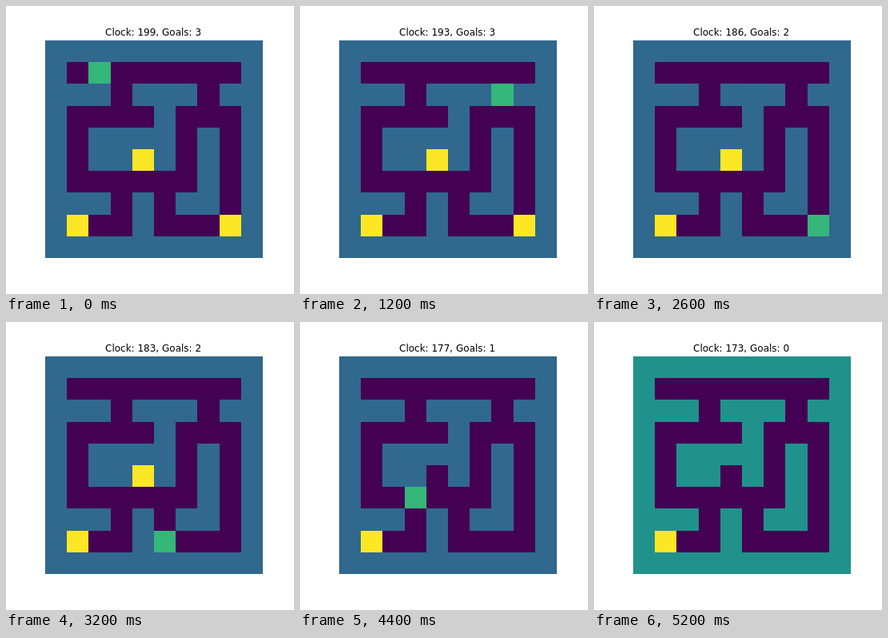
Write an HTML page that moves like this. It is 360 px wide and 360 px high and loops after 5400 ms.

```html
<!DOCTYPE html>
<html lang="en">
<head>
<meta charset="utf-8">
<title>Maze</title>
<style>
  html, body { margin: 0; width: 100%; height: 100%; overflow: hidden; background: #fff; }
  svg { display: block; width: 360px; height: 360px; }
  text { font: 12px "DejaVu Sans", sans-serif; white-space: pre; }
</style>
</head>
<body>
<svg viewBox="0 0 360 360" xmlns="http://www.w3.org/2000/svg">
  <text id="title" x="124" y="37"></text>
  <g id="board" shape-rendering="crispEdges"></g>
</svg>
<script>
const STEP = 200, CELL = 27.2, LEFT = 49, TOP = 43, START_CLOCK = 199;
const COLORS = { floor: '#440154', wall: '#31688e', agent: '#35b779', goal: '#fde725', wallDone: '#21918c' };
const MAZE = [
  '##########',
  '#........#',
  '###.###.##',
  '#....#...#',
  '#.####.#.#',
  '#.##.#.#.#',
  '#......#.#',
  '###.#.##.#',
  '#...#....#',
  '##########'
];
const GOALS = [[1, 8], [4, 5], [8, 8]];
const MOVES = 'RRRRRDDRDDDDDLLLUULUDLDDLL';
const DIRS = { R: [1, 0], L: [-1, 0], U: [0, -1], D: [0, 1] };

const path = [[2, 1]];
for (const move of MOVES) {
  const [x, y] = path[path.length - 1], [dx, dy] = DIRS[move];
  path.push([x + dx, y + dy]);
}

const same = (a, b) => a[0] === b[0] && a[1] === b[1];
const goalTimes = GOALS.map(goal => path.findIndex(pos => same(pos, goal)));

const title = document.getElementById('title');
const board = document.getElementById('board');

function addCell(col, row) {
  const rect = document.createElementNS('http://www.w3.org/2000/svg', 'rect');
  const edge = (origin, i) => Math.round(origin + i * CELL);
  const x = edge(LEFT, col), y = edge(TOP, row);
  rect.setAttribute('x', x);
  rect.setAttribute('y', y);
  rect.setAttribute('width', edge(LEFT, col + 1) - x);
  rect.setAttribute('height', edge(TOP, row + 1) - y);
  board.append(rect);
  return rect;
}

const cells = MAZE.map((line, row) => [...line].map((_, col) => addCell(col, row)));

function draw(step) {
  const left = goalTimes.filter(t => t > step).length;
  const done = left === 0;
  const paint = ([col, row], color) => cells[row][col].setAttribute('fill', color);

  MAZE.forEach((line, row) => [...line].forEach((mark, col) =>
    paint([col, row], mark === '.' ? COLORS.floor : done ? COLORS.wallDone : COLORS.wall)));
  GOALS.forEach((goal, i) => { if (goalTimes[i] > step) paint(goal, COLORS.goal); });
  // With no goals left the agent holds the top value of the color scale.
  paint(path[step], done ? COLORS.goal : COLORS.agent);
  title.textContent = `Clock: ${START_CLOCK - step}, Goals: ${left}`;
}

let shown = -1;
const begin = performance.now();
function tick() {
  const elapsed = performance.now() - begin;
  const step = Math.floor(elapsed / STEP) % path.length;
  if (step !== shown) draw(shown = step);
  requestAnimationFrame(tick);
}
tick();
</script>
</body>
</html>
```
